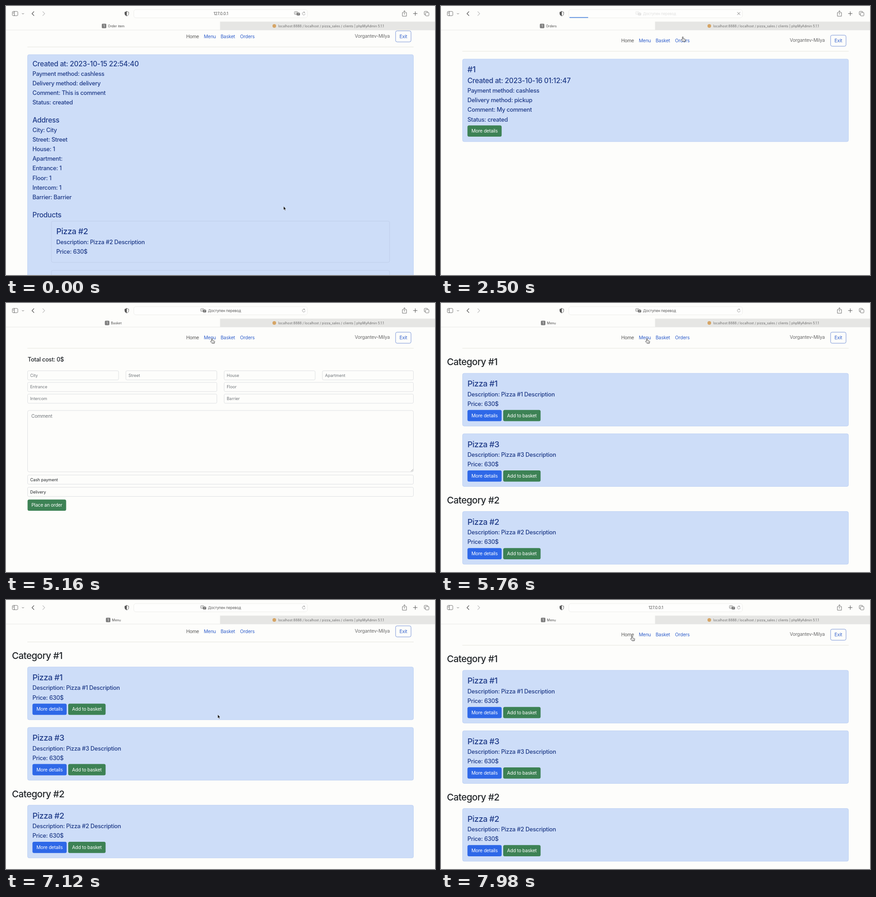
These frames come from a looping animation (945x593 px, 8 s). An HTML page:

```html
<!DOCTYPE html>
<html lang="en">
<head>
<meta charset="utf-8">
<title>Pizza orders</title>
<style>
  html, body { margin: 0; width: 100%; height: 100%; overflow: hidden; background: #fdfdfb; }
  svg { display: block; width: 100%; height: 100%; }
  text { font-family: Inter, "Noto Sans", sans-serif; white-space: pre; }
</style>
</head>
<body>
<svg id="stage" viewBox="0 0 945 593" xmlns="http://www.w3.org/2000/svg"></svg>
<script>
const LOOP = 8000;
const INK = '#212529', NAVY = '#1f3b88', BLUE = '#2e68e8', LINK = '#2f5ecb', GREEN = '#3d8255';
const GREY = '#6a6a6a', DARK = '#555', PALE = '#b8b8b8', BG = '#fdfdfb';

// size, weight, letter spacing in em
const TYPE = {
  h2: [20.5, 500, -.028], h3: [17.9, 500, -.026], h4: [15.4, 500, -.0165], h5: [12.8, 500, -.0205],
  body: [10.3, 400, -.016], small: [9, 400, 0], url: [8, 400, -.01], host: [8.3, 400, .01], tab: [7.2, 400, .009]
};

// y is the middle of the capitals
function text(x, y, str, type, fill, anchor = 'start') {
  const [size, weight, gap] = TYPE[type];
  return `<text x="${x}" y="${(y + size * .36).toFixed(2)}" font-size="${size}" font-weight="${weight}"
    letter-spacing="${(gap * size).toFixed(3)}" fill="${fill}" text-anchor="${anchor}">${str}</text>`;
}
const box = (x, y, w, h, fill, stroke = 'none', r = 3.5) =>
  `<rect x="${x}" y="${y}" width="${w}" height="${h}" rx="${r}" fill="${fill}" stroke="${stroke}" stroke-width=".8"/>`;
const line = (d, stroke = DARK, w = 1) =>
  `<path d="${d}" fill="none" stroke="${stroke}" stroke-width="${w}" stroke-linecap="round" stroke-linejoin="round"/>`;
const group = (id, body) => `<g id="${id}">${body}</g>`;
const card = (y, h) => box(47.5, y, 850, h, '#cdddf8', '#b5cbf2');
const rows = (x, y, list) => list.map((s, i) => text(x, y + i * 21.08, s, 'h5', NAVY)).join('');
const button = (x, y, w, label, fill) =>
  box(x, y, w, 24.8, fill) + text(x + w / 2, y + 12.4, label, 'body', '#fff', 'middle');

const header = () =>
  text(397, 76.5, 'Home', 'body', DARK) +
  text(435.7, 76.5, 'Menu', 'body', LINK) +
  text(472.8, 76.5, 'Basket', 'body', LINK) +
  text(515.6, 76.5, 'Orders', 'body', LINK) +
  text(845.5, 75.7, 'Vorgantev-Milya', 'body', GREY, 'end') +
  box(858.2, 64.3, 34, 24.4, 'none', '#5a7dd0') +
  text(875.2, 76.5, 'Exit', 'body', LINK, 'middle') +
  line('M47.5 99.8H897.5', '#e2e2dc', .9);

const itemPage = () =>
  card(116.7, 700) +
  text(58.3, 137.2, 'Created at: 2023-10-15 22:54:40', 'h4', NAVY) +
  rows(58.3, 159, ['Payment method: cashless', 'Delivery method: delivery',
    'Comment: This is comment', 'Status: created']) +
  text(58.3, 261, 'Address', 'h4', NAVY) +
  rows(58.3, 283, ['City: City', 'Street: Street', 'House: 1', 'Apartment:', 'Entrance: 1',
    'Floor: 1', 'Intercom: 1', 'Barrier: Barrier']) +
  text(58.3, 469.5, 'Products', 'h4', NAVY) +
  box(100, 483.7, 745, 91, 'none', '#bccbe6') +
  text(110.8, 506, 'Pizza #2', 'h3', NAVY) +
  rows(110.8, 529.5, ['Description: Pizza #2 Description', 'Price: 630$']) +
  box(100, 592.2, 745, 91, 'none', '#bccbe6');

const ordersPage = () =>
  card(117, 182) +
  text(58.3, 139.5, '#1', 'h3', NAVY) +
  text(58.3, 164.7, 'Created at: 2023-10-16 01:12:47', 'h4', NAVY) +
  rows(58.3, 186.7, ['Payment method: cashless', 'Delivery method: pickup',
    'Comment: My comment', 'Status: created']) +
  button(58.3, 263.2, 75.3, 'More details', GREEN);

function basketPage() {
  const edge = '#d6d8dc';
  const field = (x, y, w, label, fill = '#70757a') =>
    box(x, y, w, 20.2, 'none', edge, 2.6) + text(x + 5.7, y + 10.1, label, 'small', fill);
  const quarter = ['City', 'Street', 'House', 'Apartment'].map((s, i) => field(47.5 + i * 216.5, 149.4, 200.5, s));
  const half = ['Entrance', 'Floor', 'Intercom', 'Barrier'].map((s, i) =>
    field(47.5 + i % 2 * 433, 175 + (i >> 1) * 25.8, 417, s));
  return text(47.7, 124.7, 'Total cost: 0$', 'h5', INK) + quarter.join('') + half.join('') +
    box(47.5, 237, 850, 135.2, 'none', edge) +
    text(55.8, 249.4, 'Comment', 'body', '#70757a') +
    line('M892 371L896.5 366.5M894.5 371L896.5 369', '#888', .7) +
    field(47.5, 379.2, 850, 'Cash payment', INK) +
    field(47.5, 406.2, 850, 'Delivery', INK) +
    button(47.5, 433.2, 85, 'Place an order', GREEN);
}

function menuPage() {
  const pizza = (y, n) => card(y, 116.3) +
    text(58.3, y + 23, 'Pizza #' + n, 'h3', NAVY) +
    rows(58.3, y + 46.2, [`Description: Pizza #${n} Description`, 'Price: 630$']) +
    button(58.3, y + 80.7, 75.3, 'More details', BLUE) +
    button(137, y + 80.7, 82.4, 'Add to basket', GREEN);
  return text(13, 130, 'Category #1', 'h2', INK) + pizza(155, 1) + pizza(288.2, 3) +
    text(13, 434.5, 'Category #2', 'h2', INK) + pizza(459.6, 2);
}

// two overlapping speech bubbles
const bubbles = x =>
  box(x, 12.3, 7.2, 6.2, BG, GREY, 1.6) + line(`M${x + 2} 16.6L${x + 3.6} 14L${x + 5.2} 16.6`, GREY, .7) +
  box(x + 5, 14.8, 7.2, 6, GREY, 'none', 1.6) + line(`M${x + 7} 17H${x + 10.4}M${x + 7.4} 19.2L${x + 10} 17`, BG, .6);

const badge = x => box(x, 39, 10, 10, '#808080', 'none', 2) + text(x + 5, 44, '1', 'tab', '#fff', 'middle');
const tabTitle = (id, x, label) => group(id, badge(x) + text(x + 13.6, 44, label, 'tab', '#444'));

const chrome = () =>
  box(0, 0, 945, 53, BG, 'none', 0) +
  box(471.5, 34.5, 474, 18.5, '#e6e6e4', 'none', 0) +
  line('M0 53H945', '#e4e4e2', .8) +
  box(14, 12, 12, 9.4, 'none', DARK, 1.8) + line('M18.3 12V21.4', DARK, .9) + line('M15.6 14.4H16.8M15.6 16.2H16.8', DARK, .6) +
  line('M35.6 16.2L37.4 18L39.2 16.2', DARK, .9) +
  line('M61.5 12.4L57.2 16.8L61.5 21.2', '#444', 1.2) +
  line('M81 12.4L85.3 16.8L81 21.2', PALE, 1.1) +
  '<path d="M266 11.8C264.5 13 263 13.3 261.8 13.4V17.4C261.8 19.6 264 21.2 266 22Z" fill="#555"/>' +
  line('M266 11.8C267.5 13 269 13.3 270.2 13.4V17.4C270.2 19.6 268 21.2 266 22C264 21.2 261.8 19.6 261.8 17.4V13.4C263 13.3 264.5 13 266 11.8Z', DARK, .9) +
  box(281.5, 8, 382.5, 18, '#fefefd', '#e9e9e6', 4.5) +
  group('ip', text(473.3, 17, '127.0.0.1', 'host', '#444', 'middle') + bubbles(635.3)) +
  group('translate', bubbles(428.8) + text(445, 17, 'Доступен перевод', 'url', '#555')) +
  group('reload', line('M658.7 15.2A3.2 3.2 0 1 0 659 17.6M656.4 12.4L658 14L656.2 15.4', '#888', .8)) +
  group('stop', line('M653 13.8L658.6 19.4M658.6 13.8L653 19.4', GREY, .9)) +
  '<rect id="bar" x="283" y="24.6" width="0" height="1.6" fill="#4580dc"/>' +
  group('share', line('M875.6 14.6H873.2V22.4H882.2V14.6H879.8M877.7 18.6V10.6M875.4 12.7L877.7 10.4L880 12.7', 'currentColor', .95)) +
  line('M897.2 16.7H905.8M901.5 12.4V21', DARK, 1) +
  box(921.3, 11.8, 7.6, 7.6, 'none', DARK, 1.5) + box(924, 14.2, 7.6, 7.6, BG, DARK, 1.5) +
  tabTitle('tab0', 211, 'Order item') + tabTitle('tab1', 217.7, 'Orders') +
  tabTitle('tab2', 217.7, 'Basket') + tabTitle('tab3', 220, 'Menu') +
  '<circle cx="591" cy="44" r="4" fill="#d6a566"/>' +
  text(599.7, 44, 'localhost:8888 / localhost / pizza_sales / clients | phpMyAdmin 5.1.1', 'tab', GREY);

const cursor = () => group('cursor',
  group('arrow', '<path d="M-.6 -.5V7.6L1.2 6.1L2.5 8.8L3.8 8.2L2.6 5.6H5Z" fill="#111" stroke="#fff" stroke-width=".5"/>') +
  group('hand', '<path d="M-.4 .8C-.4 -.5 1.6 -.5 1.6 .8V4.2L5.6 5.1C6.5 5.3 6.8 6 6.7 6.8L6 10.4H1L-2.2 6.8C-2.9 5.8 -1.6 5 -.4 6.1Z" fill="#fff" stroke="#333" stroke-width=".9" stroke-linejoin="round"/>' +
    line('M1.8 7V9M3.3 7V9M4.8 7V9', '#555', .5)));

const stage = document.getElementById('stage');
stage.innerHTML =
  group('page', header() + [itemPage, ordersPage, basketPage, menuPage].map((p, i) => group('view' + i, p())).join('')) +
  chrome() + cursor();
const el = {};
stage.querySelectorAll('[id]').forEach(n => el[n.id] = n);

// value of a keyed track [[time, ...values]] with smooth steps between keys
function track(keys, t) {
  const i = keys.findIndex(k => k[0] > t);
  if (i < 0) return keys[keys.length - 1].slice(1);
  if (!i) return keys[0].slice(1);
  const a = keys[i - 1], b = keys[i], u = (t - a[0]) / (b[0] - a[0]), s = u * u * (3 - 2 * u);
  return a.slice(1).map((v, j) => v + (b[j + 1] - v) * s);
}

const POINTER = [[0, 612, 442], [1000, 612, 442], [2150, 532, 68], [2850, 532, 68], [3480, 483, 76],
  [4350, 483, 76], [4920, 453, 78.5], [5880, 453, 78.5], [6520, 467, 253], [7460, 467, 253], [7880, 420, 79.5]];
const SCROLL = [[0, 9.5], [360, 0], [6900, 0], [7110, 7.3], [7440, 7.3], [7620, 0]];
const IP = [[0, 1], [2380, 1], [2460, 0], [3700, 0], [3760, .18], [3900, .18], [3960, 0],
  [5380, 0], [5440, .18], [5520, .18], [5560, 0], [7640, 0], [7760, 1]];
const TRANSLATE = [[2460, 0], [2500, .18], [2540, .25], [2640, 1], [3620, 1], [3700, 0], [3960, 0],
  [4060, 1], [5300, 1], [5380, 0], [5560, 0], [5660, 1], [7560, 1], [7640, 0]];
// start, page shown, title shown, share enabled, end
const LOADS = [[2380, 2500, 2500, 2500, 2680], [3700, 3800, 3900, 3900, 4000], [5360, 5460, 5540, 5540, 5640]];
const LINKS = [[397, 425], [435, 462], [472, 505], [515, 548]];

const show = (id, on) => el[id].style.display = on ? '' : 'none';

function draw(t) {
  const view = LOADS.filter(l => t >= l[1]).length, title = LOADS.filter(l => t >= l[2]).length;
  for (let i = 0; i < 4; i++) {
    show('view' + i, i === view);
    show('tab' + i, i === title);
  }
  const [scroll] = track(SCROLL, t);
  el.page.setAttribute('transform', `translate(0 ${-scroll})`);

  const load = LOADS.find(l => t >= l[0] && t < l[4]);
  show('stop', load);
  show('reload', !load);
  let width = 0;
  if (load) {
    const dt = t - load[0], slow = 200, span = load[4] - load[0];
    width = dt < slow ? dt * .34 : 68 + 310 * (dt - slow) / (span - slow);
  }
  el.bar.setAttribute('width', width);
  el.share.style.color = load && t < load[3] ? PALE : GREY;
  el.ip.setAttribute('opacity', track(IP, t)[0]);
  el.translate.setAttribute('opacity', track(TRANSLATE, t)[0]);

  const [x, y] = track(POINTER, t);
  const over = y > 66 && y < 88 && LINKS.some(([a, b]) => x >= a && x <= b);
  el.cursor.setAttribute('transform', `translate(${x} ${y})`);
  show('hand', over);
  show('arrow', !over);
}

const start = performance.now();
function tick() {
  draw((performance.now() - start) % LOOP);
  requestAnimationFrame(tick);
}
tick();
</script>
</body>
</html>
```
